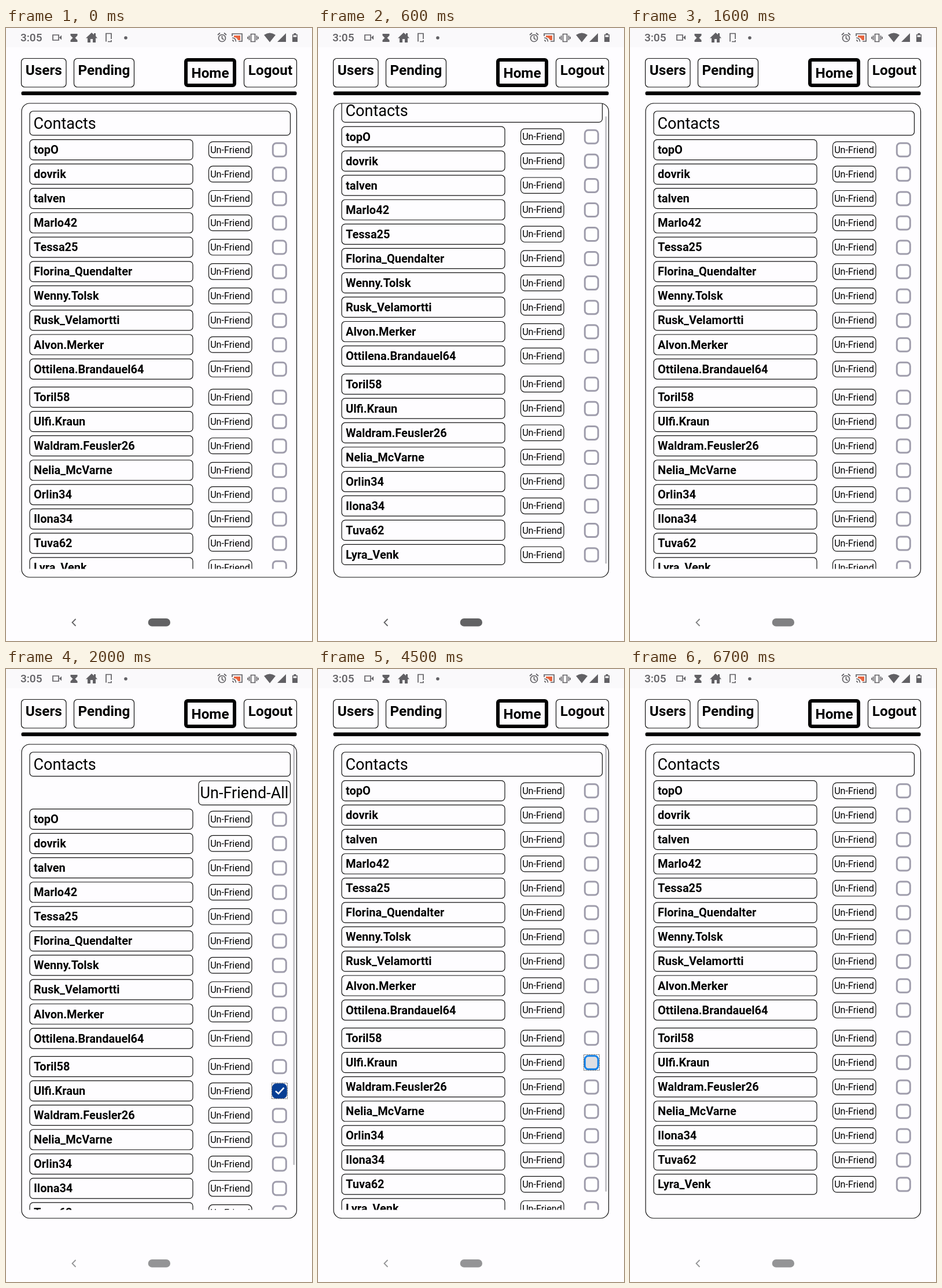
Write an HTML page that moves like this. It is 529 px wide and 1058 px high and loops after 8 s.

```html
<!DOCTYPE html>
<html lang="en">
<head>
<meta charset="utf-8">
<title>Contacts</title>
<style>
  html, body { margin: 0; width: 100%; height: 100%; overflow: hidden; background: #fefdff; }
  svg { display: block; font-family: Roboto, Arial, sans-serif; }
  .box { fill: none; stroke: #111; stroke-width: 1.2; }
  .nav { font: 700 24.3px Roboto, sans-serif; text-anchor: middle; }
  .big { font-size: 27px; }
  .name { font: 700 20px Roboto, sans-serif; }
  .small { font-size: 16.2px; text-anchor: middle; }
  .line { fill: none; stroke: #616064; stroke-width: 1.7; }
  .solid { fill: #616064; }
  .focus { fill: none; stroke: #111; stroke-dasharray: 1.5 1.5; display: none; }
  .tick { fill: none; stroke: #fff; stroke-width: 2.6; display: none; }
  .check { fill: #fff; stroke: #9f9dac; stroke-width: 3; }
  .on .check { fill: #2660e0; stroke: #2660e0; }
  .on .tick { display: inline; }
  .active .check { fill: #dfdfe3; stroke: #1583ea; }
  .on.active .check { fill: #073e94; stroke: #073e94; }
  .active .ring, .pressed .press { display: inline; }
</style>
</head>
<body>
<svg width="529" height="1058" viewBox="0 0 529 1058">
  <defs><clipPath id="view"><rect x="27" y="130" width="475" height="803.5"/></clipPath></defs>
  <rect width="529" height="33" fill="#faf9fb"/>

  <text x="25" y="23" font-size="19" font-weight="500" class="solid">3:05</text>
  <path class="line" d="M81 12h10v9h-10z M182 19V9.500h-9v14 M176 23.500h6V21"/>
  <path class="solid" d="M92 16.500l4-4v8z M111.500 10h12v3l-4 4 4 4v3h-12v-3l4-4-4-4z
    M138 17.500l10-9.500 4 3.500V9h3v5l3 3.500h-3V25h-5v-6h-4v6h-5v-7.500z"/>
  <circle class="solid" cx="207" cy="17" r="2.800"/>
  <circle class="line" cx="373.500" cy="17.500" r="6"/>
  <path class="line" d="M373.500 13.500v4.500l3 2 M366 12l4-3.500 M381 12l-4-3.500"/>
  <path d="M394 13h11v8h-4q-2-5-7-5z" fill="#e8653f"/>
  <path class="line" d="M391 14v-4h17v13h-6 M391 17q6 0 6.500 6.500 M391 21q2 0 2.500 2.500
    M423.500 10.500h7v13h-7z M420.500 13v8 M418 15v4 M433.500 13v8 M436 15v4"/>
  <path class="solid" d="M446 12q10-7 20 0l-10 12.500z M484 9v15h-15z M495 11h2.500V9h4v2h2.500v13h-9z"/>
  <rect x="496.500" y="12.500" width="6" height="3" fill="#faf9fb"/>

  <rect class="box" x="26.500" y="52.500" width="77.500" height="49.500" rx="6"/>
  <rect class="box" x="117.500" y="52.500" width="104" height="49.500" rx="6"/>
  <rect class="box" x="411.500" y="52.500" width="91" height="49.500" rx="6"/>
  <rect x="311" y="55" width="84" height="44" rx="3" fill="none" stroke="#000" stroke-width="6"/>
  <g class="nav">
    <text x="65.300" y="81">Users</text>
    <text x="169.500" y="81">Pending</text>
    <text x="353" y="86">Home</text>
    <text x="457" y="81">Logout</text>
  </g>
  <rect x="26.500" y="109.500" width="476" height="6.500" rx="2.500"/>

  <g clip-path="url(#view)">
    <g id="content">
      <rect class="box" x="41" y="143.500" width="450.500" height="41.700" rx="6"/>
      <text class="big" x="47.500" y="174">Contacts</text>
      <g id="all">
        <rect class="box" x="333" y="193" width="158.500" height="41.700" rx="6"/>
        <text class="big" x="412" y="223" text-anchor="middle">Un-Friend-All</text>
      </g>
    </g>
    <rect id="bar" x="496.500" width="2.500" rx="1" fill="#bcbbc0"/>
  </g>
  <rect class="box" x="27" y="130" width="475.500" height="818" rx="14"/>

  <g id="system">
    <path d="M120.500 1020l-6 6 6 6" fill="none" stroke="currentColor" stroke-width="1.800"/>
    <rect x="245.700" y="1019" width="38.300" height="13.700" rx="6.800" fill="currentColor"/>
  </g>
</svg>
<script>
const LOOP = 8000, PITCH = 42.05, MAX_SCROLL = 22.5;
const names = ['topO', 'dovrik', 'talven', 'Marlo42', 'Tessa25', 'Florina_Quendalter', 'Wenny.Tolsk',
  'Rusk_Velamortti', 'Alvon.Merker', 'Ottilena.Brandauel64', 'Toril58', 'Ulfi.Kraun',
  'Waldram.Feusler26', 'Nelia_McVarne', 'Orlin34', 'Ilona34', 'Tuva62', 'Lyra_Venk'];
const FIRST = 11, SECOND = 6, REMOVED = 14;
const byId = id => document.getElementById(id);
const [content, all, bar, system] = ['content', 'all', 'bar', 'system'].map(byId);

const rows = names.map(name => {
  const row = document.createElementNS('http://www.w3.org/2000/svg', 'g');
  row.innerHTML = `
    <rect class="box" x="41" y="-17.500" width="282" height="35" rx="6"/>
    <text class="name" x="48" y="7">${name}</text>
    <rect class="box" x="350.500" y="-13.700" width="74.500" height="27.400" rx="7"/>
    <text class="small" x="387.500" y="5.600">Un-Friend</text>
    <rect class="focus press" x="347.500" y="-16.500" width="80.500" height="33"/>
    <rect class="check" x="461.300" y="-11.300" width="23" height="23" rx="6"/>
    <path class="tick" d="M466 .2l5 4.600 9.500-10.300"/>
    <rect class="focus ring" x="459.500" y="-13.500" width="27" height="27"/>`;
  content.append(row);
  return row;
});

const clamp = v => Math.min(1, Math.max(0, v));
const ease = (t, from, to) => {
  const u = clamp((t - from) / (to - from));
  return u * u * (3 - 2 * u);
};
const within = (t, from, to) => t >= from && t < to;
const show = (el, visible) => el.style.display = visible ? 'inline' : 'none';

function draw(t) {
  const scroll = MAX_SCROLL * (ease(t, 0, 500) - ease(t, 600, 1000));
  const selecting = within(t, 2000, 4500);
  const removed = t >= 6700;
  content.setAttribute('transform', `translate(0 ${-scroll})`);
  show(all, selecting);

  rows.forEach((row, i) => {
    const slot = i - (removed && i > REMOVED);
    const y = 210.1 + slot * PITCH + (slot > 9 ? 6.5 : 0) + (selecting ? 49 : 0);
    row.setAttribute('transform', `translate(0 ${y})`);
    show(row, !(removed && i === REMOVED));
  });

  const toggle = (i, cls, on) => rows[i].classList.toggle(cls, on);
  toggle(FIRST, 'on', selecting);
  toggle(FIRST, 'active', within(t, 2000, 3000) || within(t, 4500, 5900));
  toggle(SECOND, 'on', within(t, 3000, 3700));
  toggle(SECOND, 'active', within(t, 3000, 4500));
  toggle(REMOVED, 'pressed', within(t, 5900, 6700));

  show(bar, within(t, 100, 1600) || within(t, 2000, 2500) || within(t, 4500, 5000));
  bar.setAttribute('y', 130 + scroll);
  bar.setAttribute('height', selecting ? 726 : 772);

  const grey = 98 + 50 * clamp((t - 1000) / 1000);
  system.style.color = `rgb(${grey}, ${grey}, ${grey + 2})`;
}

function tick() {
  draw(Math.floor(performance.now() % LOOP / 100) * 100);
  requestAnimationFrame(tick);
}
tick();
</script>
</body>
</html>
```
